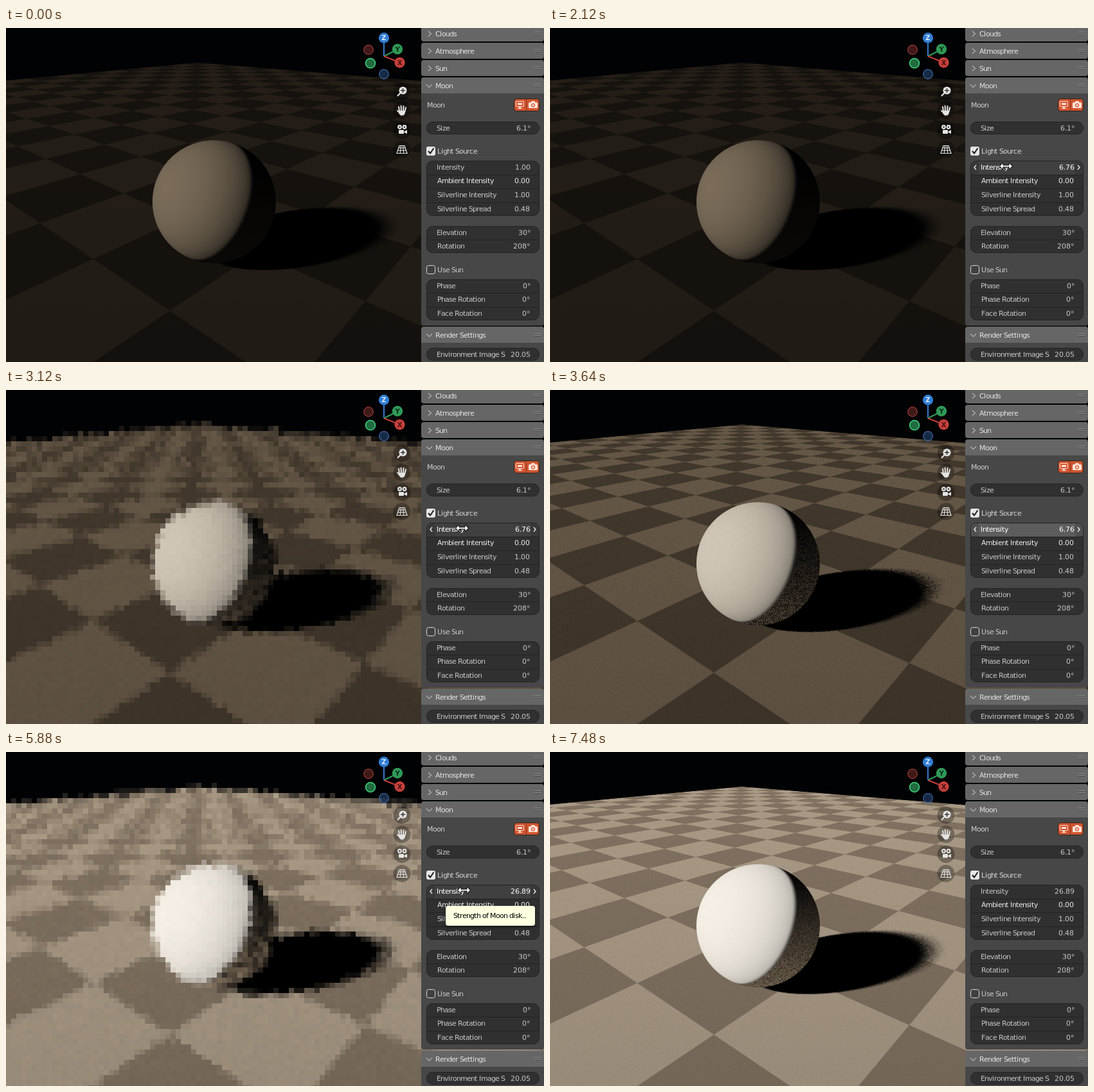
Write an HTML page with a canvas that moves like this. It is 837 px wide and 521 px high and loops after 7560 ms.

```html
<!DOCTYPE html>
<html lang="en">
<head>
<meta charset="utf-8">
<title>Moon light intensity</title>
<style>
html, body { margin: 0; width: 100%; height: 100%; overflow: hidden; background: #000; }
canvas { display: block; width: 837px; height: 521px; }
</style>
</head>
<body>
<canvas id="stage" width="837" height="521"></canvas>
<script>
const W = 837, H = 521, LOOP = 7560, FONT = '"DejaVu Sans", sans-serif';
const ctx = document.getElementById('stage').getContext('2d');
const clamp = (v, lo = 0, hi = 1) => Math.min(hi, Math.max(lo, v));
const mix = (a, b, k) => a + (b - a) * k;
const smooth = (lo, hi, v) => { const k = clamp((v - lo) / (hi - lo)); return k * k * (3 - 2 * k); };

// ---------- rendered scene ----------
const LEVELS = [
  { light: [34, 28, 22], dark: [21, 17, 13], ball: [122, 108, 89], pow: 0.38, amb: [11, 9, 7] },
  { light: [95, 82, 66], dark: [62, 53, 42], ball: [208, 198, 182], pow: 0.19, amb: [56, 48, 39] },
  { light: [158, 144, 125], dark: [120, 106, 90], ball: [245, 239, 229], pow: 0.125, amb: [100, 87, 71] }
];
const GRID = { horizon: -4, va: 917, vb: -404, a0: -1.488, da: 0.6555, b0: 1.481, db: 0.7586, size: 14 };
const BALL = { x: 323.8, y: 271, r: 96 };
const SUN = [-0.768, -0.275, 0.578];

function random(seed) {
  return () => {
    seed = (seed + 0x6D2B79F5) | 0;
    let v = Math.imul(seed ^ (seed >>> 15), 1 | seed);
    v = (v + Math.imul(v ^ (v >>> 7), 61 | v)) ^ v;
    return ((v ^ (v >>> 14)) >>> 0) / 4294967296;
  };
}

// antialiased square wave with period 2
function wave(u, width) {
  const t = u / 2 - Math.floor(u / 2), m = t < 0.5 ? t : t - 0.5;
  const d = Math.min(m, 0.5 - m) * 2;
  return clamp(d * 2 / width) * (t < 0.5 ? 1 : -1);
}

function shadowAt(x, y) {
  const rho = 0.37, u = (x - 452) / 138, v = (329 - y) / 48.5;
  const q = Math.sqrt((u * u - 2 * rho * u * v + v * v) / (1 - rho * rho));
  const t = clamp((x - 330) / 270);
  const w = 0.02 + 0.16 * t * t * t;
  return 1 - smooth(1 - w, 1 + w * 1.2, q);
}

function shade(x, y, lv, grain, rnd, out) {
  const n = rnd() * 2 - 1;
  out[0] = 1; out[1] = 2; out[2] = 4 * (1 - y / H);
  const depth = y - GRID.horizon;
  const a = (x - GRID.va) / depth, b = (x - GRID.vb) / depth;
  const i = (a - GRID.a0) / GRID.da, j = (b - GRID.b0) / GRID.db;
  const wi = (1 + Math.abs(a) * 0.7) / depth / GRID.da;
  const wj = (1 + Math.abs(b) * 0.7) / depth / GRID.db;
  const cover = depth > 40 ? clamp((i + GRID.size) / wi + 0.5) * clamp((GRID.size - j) / wj + 0.5) : 0;
  if (cover > 0) {
    const k = 0.5 + 0.5 * wave(i, wi) * wave(j, wj);
    let sh = shadowAt(x, y);
    if (sh > 0 && sh < 1) sh = mix(sh, rnd() < sh ? 1 : 0, grain * 0.4);
    const f = mix(1.08, 0.96, y / H) * (1 - sh) * (1 + n * grain * 0.045);
    for (let c = 0; c < 3; c++) out[c] = mix(out[c], mix(lv.dark[c], lv.light[c], k) * f, cover);
  }
  const dx = (x - BALL.x) / BALL.r, dy = (y - BALL.y) / BALL.r, d2 = dx * dx + dy * dy;
  if (d2 < 1.02) {
    const edge = clamp((1 - Math.sqrt(d2)) * BALL.r + 0.5);
    const nl = SUN[0] * dx + SUN[1] * dy + SUN[2] * Math.sqrt(Math.max(0, 1 - d2));
    const lit = Math.pow(Math.max(nl, 0.001), lv.pow) * smooth(-0.04, 0.11, nl) * (1 + n * grain * 0.015);
    const bounce = clamp(0.45 + 0.5 * dy, 0.08, 1) * Math.max(0, 1 + n * grain * 0.9);
    for (let c = 0; c < 3; c++) {
      out[c] = mix(out[c], Math.max(lv.ball[c] * lit, lv.amb[c] * bounce), edge);
    }
  }
}

const cache = {};
function scene(level, block, grain) {
  const key = [level, block, grain].join();
  if (cache[key]) return cache[key];
  const cv = document.createElement('canvas');
  cv.width = W; cv.height = H;
  const g = cv.getContext('2d'), img = g.createImageData(W, H), px = img.data;
  const rnd = random(level * 97 + block * 13 + Math.round(grain * 100)), c = [0, 0, 0];
  // coarse passes filter an area a little wider than the block
  const samples = block > 1 ? 5 : 1;
  const jitter = () => block > 1 ? block * (0.5 + (rnd() - 0.5) * 1.5) : 0.5;
  for (let y = 0; y < H; y += block) for (let x = 0; x < W; x += block) {
    let r = 0, gr = 0, b = 0;
    for (let s = 0; s < samples; s++) {
      shade(x + jitter(), y + jitter(), LEVELS[level], grain, rnd, c);
      r += c[0]; gr += c[1]; b += c[2];
    }
    for (let v = y; v < Math.min(H, y + block); v++) for (let u = x; u < Math.min(W, x + block); u++) {
      const p = (v * W + u) * 4;
      px[p] = r / samples; px[p + 1] = gr / samples; px[p + 2] = b / samples; px[p + 3] = 255;
    }
  }
  g.putImageData(img, 0, 0);
  return cache[key] = cv;
}

// start time, light level (-1: cleared viewport), block size, grain
const PASSES = [
  [0, 0, 1, 0.1], [2840, -1], [3120, 1, 8, 1], [3200, 1, 4, 1], [3240, 1, 2, 1],
  [3480, 1, 1, 1], [3680, 1, 1, 0.85], [3960, 1, 1, 0.7], [4280, 1, 1, 0.58],
  [4600, 1, 1, 0.48], [4800, 1, 1, 0.42], [5480, 1, 1, 0.36], [5680, -1],
  [5880, 2, 8, 1], [5960, 2, 4, 1], [6040, 2, 2, 1], [6240, 2, 1, 1],
  [6480, 2, 1, 0.8], [6800, 2, 1, 0.65], [7480, 2, 1, 0.5]
];

function drawScene(t) {
  const p = PASSES.filter(q => q[0] <= t).pop();
  if (p[1] < 0) rect(0, 0, W, H, 0, '#414141');
  else ctx.drawImage(scene(p[1], p[2], p[3]), 0, 0);
}

// ---------- drawing helpers ----------
function rect(x, y, w, h, r, fill, stroke) {
  ctx.beginPath();
  ctx.roundRect(x, y, w, h, r);
  if (fill) { ctx.fillStyle = fill; ctx.fill(); }
  if (stroke) { ctx.strokeStyle = stroke; ctx.lineWidth = 1; ctx.stroke(); }
}
function disc(x, y, r, fill, stroke, lw = 1.2) {
  ctx.beginPath();
  ctx.arc(x, y, r, 0, Math.PI * 2);
  if (fill) { ctx.fillStyle = fill; ctx.fill(); }
  if (stroke) { ctx.strokeStyle = stroke; ctx.lineWidth = lw; ctx.stroke(); }
}
function trace(pts) {
  ctx.beginPath();
  for (let i = 0; i < pts.length; i += 2) ctx.lineTo(pts[i], pts[i + 1]);
}
function line(color, lw, ...pts) {
  trace(pts);
  ctx.strokeStyle = color; ctx.lineWidth = lw; ctx.stroke();
}
function poly(fill, ...pts) {
  trace(pts);
  ctx.closePath(); ctx.fillStyle = fill; ctx.fill();
}

// UI text sits on whole-pixel advances
const advances = {};
function advance(ch) {
  if (!(ch in advances)) {
    ctx.font = '2048px ' + FONT;
    advances[ch] = Math.floor(Math.round(ctx.measureText(ch).width * 11 / 32) / 64);
  }
  return advances[ch];
}
function text(str, x, midY, color, right) {
  const steps = [...str].map(advance);
  if (right) x -= steps.reduce((a, b) => a + b, 0);
  ctx.font = '11px ' + FONT;
  ctx.fillStyle = color;
  [...str].forEach((ch, i) => { ctx.fillText(ch, x, midY + 4); x += steps[i]; });
}

// ---------- viewport overlays ----------
function drawGizmo() {
  const ox = 588, oy = 44;
  disc(564, 34, 7.3, 'rgba(150,60,55,.42)', '#9c3a38');
  disc(588, 72, 7.3, 'rgba(50,90,150,.45)', '#3c66a6');
  line('#2f7bd0', 2, ox, oy, 588, 20);
  line('#2f9a58', 2, ox, oy, 606, 35);
  line('#c43d3a', 2, ox, oy, 608, 52);
  disc(567, 55, 7.5, 'rgba(52,165,95,.65)', '#40d582', 1.5);
  ctx.textAlign = 'center';
  [[588, 15.5, '#2f7dd3', 'Z', '#d6e6f6'], [609, 33, '#2f9a58', 'Y', '#0e2c1a'], [612.5, 54, '#c5403b', 'X', '#471310']]
    .forEach(([x, y, color, name, ink]) => {
      disc(x, y, 8.2, color);
      ctx.font = 'bold 10px ' + FONT;
      ctx.fillStyle = ink;
      ctx.fillText(name, x, y + 3.7);
    });
  ctx.textAlign = 'left';
}

function drawNav() {
  const ink = '#e4e4e4';
  [98, 128, 159, 189].forEach(y => disc(616, y + 0.5, 13.5, 'rgba(0,0,0,.3)'));
  ctx.lineCap = 'round';
  line(ink, 2.2, 613, 102, 609.5, 105.5);
  disc(617.5, 97.5, 6, ink);
  line('#303030', 1.5, 614.5, 97.5, 620.5, 97.5);
  line('#303030', 1.5, 617.5, 94.5, 617.5, 100.5);
  [[612, 130, 611, 123], [615, 129, 614.6, 121.5], [618, 129, 618.5, 122], [620.5, 130, 622, 124], [613, 133, 609, 129]]
    .forEach(f => line(ink, 2, ...f));
  poly(ink, 611, 129, 621.6, 129, 620.5, 134, 618, 136.5, 614, 136.5, 611, 133);
  ctx.lineCap = 'butt';
  disc(612.5, 154.5, 3.4, ink); disc(620, 154.5, 3.4, ink);
  disc(612.5, 154.5, 1.2, '#333'); disc(620, 154.5, 1.2, '#333');
  rect(611, 159, 8, 6, 1, ink);
  poly(ink, 619.5, 161.5, 624, 159, 624, 165, 619.5, 163);
  line(ink, 1.2, 612, 183.5, 620, 183.5, 624, 195.5, 608, 195.5, 612, 183.5);
  line(ink, 1.1, 611, 187, 621.5, 187);
  line(ink, 1.1, 609.5, 191, 623, 191);
  line(ink, 1.1, 614.5, 183, 613.3, 195);
  line(ink, 1.1, 617.5, 183, 618.7, 195);
}

// ---------- side panel ----------
const GROUPS = [
  { y: 146, h: 20, rows: [['Size', '6.1°']] },
  { y: 207, h: 86, rows: [['Intensity', ''], ['Ambient Intensity', '0.00'], ['Silverline Intensity', '1.00'], ['Silverline Spread', '0.48']] },
  { y: 309, h: 42, rows: [['Elevation', '30°'], ['Rotation', '208°']] },
  { y: 392, h: 64, rows: [['Phase', '0°'], ['Phase Rotation', '0°'], ['Face Rotation', '0°']] },
  { y: 499, h: 20, rows: [['Environment Image S', '20.05']] }
];

function drawHeader(name, mid, open) {
  const y = mid - 13;
  rect(646, y, 191, 25, open ? [4, 4, 0, 0] : 4, '#666');
  if (open) line('#b5b5b5', 1.2, 654, mid - 2, 658.5, mid + 2.5, 663, mid - 2);
  else line('#b5b5b5', 1.2, 657, mid - 4, 661.5, mid, 657, mid + 4);
  text(name, 668, mid, '#e4e4e4');
  for (let c = 0; c < 4; c++) for (let r = 0; r < 2; r++) {
    const x = 821 + c * 3, v = mid - 3 + r * 3;
    rect(x, v, 2, 1, 0, '#a2a2a2');
    rect(x, v + 1, 2, 1, 0, '#3c3c3c');
  }
}

function drawField(g, s) {
  const step = g.h / g.rows.length, last = g.rows.length - 1;
  rect(654.5, g.y + 0.5, 175, g.h - 1, 9, '#303030', '#222');
  g.rows.forEach(([label, value], i) => {
    const top = g.y + i * step, mid = Math.floor(g.y + 10 + i * 21.67);
    const main = label === 'Intensity', shift = i ? 1 : 0;
    const hover = s.mouse && s.mouse.x > 654 && s.mouse.y > top && s.mouse.y < top + step || main && s.hover;
    const pressed = main && s.pressed, on = hover || pressed;
    if (on) {
      const rad = [i ? 0 : 8, i ? 0 : 8, i === last ? 8 : 0, i === last ? 8 : 0];
      rect(655, top + 1, 174, step - 1, rad, pressed ? '#505050' : '#383838');
      rect(667, top + 1, 150, step - 1, 0, pressed ? '#5d5d5d' : '#404040');
      line('#f2f2f2', 1.3, 663, mid - 3, 660, mid + 0.5, 663, mid + 4);
      line('#f2f2f2', 1.3, 821, mid - 3, 824, mid + 0.5, 821, mid + 4);
    }
    if (i) rect(655, Math.round(top), 174, 1, 0, '#232323');
    const ink = on ? '#fff' : label === 'Ambient Intensity' ? '#ebebeb' : '#c8c8c8';
    text(label, 670 + shift, mid, ink);
    text(main ? s.value.toFixed(2) : value, 816 - shift, mid, ink, true);
  });
}

function drawPanel(s) {
  rect(646, 90, 191, 374, [0, 0, 4, 4], '#474747');
  rect(646, 480, 191, 41, 0, '#474747');
  drawHeader('Clouds', 9);
  drawHeader('Atmosphere', 36);
  drawHeader('Sun', 63);
  drawHeader('Moon', 90, true);
  drawHeader('Render Settings', 479, true);

  text('Moon', 655, 120, '#d0d0d0');
  rect(790.5, 110.5, 39, 19, 4, '#d2552f', '#2e211d');
  rect(809, 111, 1, 18, 0, '#7d3825');
  const ink = '#ffe3d8';
  rect(793.5, 114.5, 12, 8, 1, null, ink);
  rect(796, 117, 7, 3, 0, ink);
  rect(798, 123, 3, 2, 0, ink);
  rect(796, 125, 7, 1, 0, ink);
  rect(813, 116, 14, 9, 1.5, ink);
  rect(817, 114, 6, 3, 1, ink);
  disc(820, 120.5, 3, '#d2552f');
  disc(820, 120.5, 1.7, ink);

  rect(654, 185, 14, 14, 3, '#e6e6e6');
  line('#1c1c1c', 2, 657, 192, 660, 195.5, 665.5, 187.5);
  text('Light Source', 671, 192, '#d6d6d6');
  rect(654.5, 370.5, 13, 13, 3, '#404040', '#dedede');
  text('Use Sun', 671, 377, '#c8c8c8');
  GROUPS.forEach(g => drawField(g, s));
}

function drawTooltip() {
  ctx.save();
  ctx.shadowColor = 'rgba(0,0,0,.5)';
  ctx.shadowBlur = 5;
  ctx.shadowOffsetY = 2;
  rect(684, 240, 139, 31, 4, '#ffffe1');
  ctx.restore();
  text('Strength of Moon disk..', 696, 255, '#000');
}

function drawCursor({ x, y }) {
  const overField = GROUPS.some(g => y > g.y && y < g.y + g.h);
  ctx.lineJoin = 'round';
  const shape = overField
    ? [-9.5, 0, -5, -4.5, -5, -1, 5, -1, 5, -4.5, 9.5, 0, 5, 4.5, 5, 1, -5, 1, -5, 4.5, -9.5, 0]
    : [0, 0, 0, 15, 3.5, 11.5, 6, 17, 8, 16, 5.7, 10.8, 10.5, 10.5, 0, 0];
  const pts = shape.map((v, i) => v + (i % 2 ? y : x));
  line('#000', 1.8, ...pts);
  poly('#fff', ...pts);
  ctx.lineJoin = 'miter';
}

// ---------- timeline ----------
function intensity(t) {
  if (t < 1040) return 1;
  if (t < 1800) {
    const k = (Math.floor((t - 1040) / 68) + 1) / 11;
    return mix(1, 6.74, Math.sin(clamp(k) * Math.PI / 2));
  }
  if (t < 3880) return 6.76;
  const k = (Math.floor((t - 3880) / 72) + 1) / 10;
  return mix(6.76, 26.89, smooth(0, 1, k));
}

function pointer(t) {
  const travel = (x0, y0, x1, y1, k) => {
    const e = smooth(0, 1, k);
    return { x: Math.round(mix(x0, x1, e)), y: Math.round(mix(y0, y1, e)) };
  };
  if (t >= 200 && t < 800) return travel(686, 455, 709, 216, (t - 200) / 580);
  if (t >= 2120 && t < 3640) return { x: 709.5, y: 215.5 };
  if (t >= 4600 && t < 6400) return { x: 712.5, y: 215.5 };
  if (t >= 6400 && t < 6920) return travel(712, 216, 690, 522, (t - 6360) / 560);
  return null;
}

function frame(now) {
  const t = Math.floor(((now % LOOP) + LOOP) % LOOP / 40) * 40;
  const s = {
    value: intensity(t),
    mouse: pointer(t),
    pressed: (t >= 800 && t < 2000) || (t >= 3640 && t < 4600),
    hover: t >= 2000 && t < 2120
  };
  drawScene(t);
  drawGizmo();
  drawNav();
  drawPanel(s);
  if (t >= 5880 && t < 6400) drawTooltip();
  if (s.mouse) drawCursor(s.mouse);
}

const start = performance.now();
function tick() {
  frame(performance.now() - start);
  requestAnimationFrame(tick);
}
tick();
</script>
</body>
</html>
```
